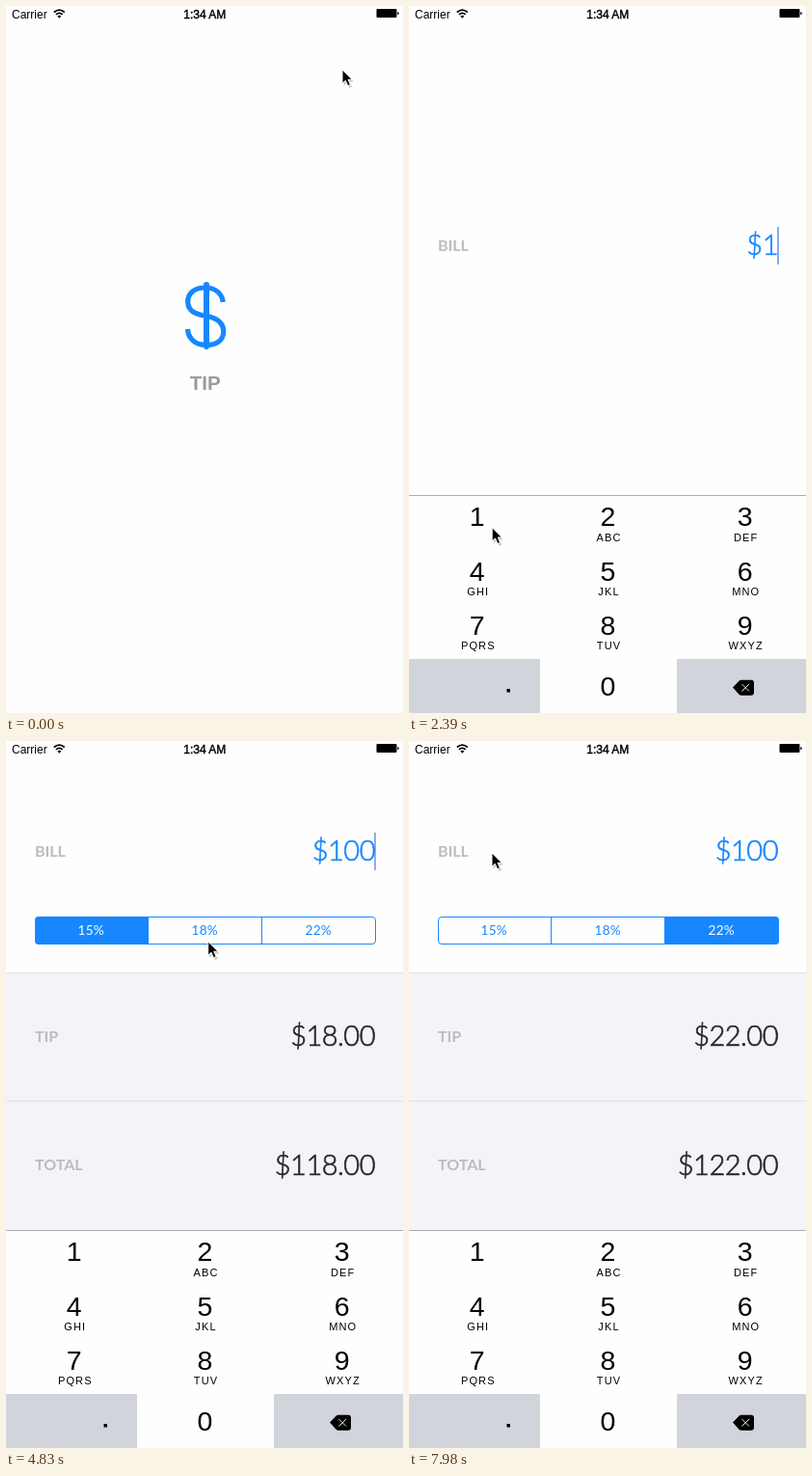
Animation of 412 by 733 pixels, one loop 8000 ms. Source, as an HTML page:

```html
<!DOCTYPE html>
<html lang="en">
<head>
<meta charset="utf-8">
<title>Tip calculator</title>
<style>
  html, body { margin: 0; width: 100%; height: 100%; overflow: hidden; background: #fefefe; }
  svg { display: block; width: 100vw; height: 100vh; }
  text { font-family: "Liberation Sans", Arial, sans-serif; }
  .label { font: 700 16px Lato, sans-serif; fill: #bbbbc1; }
  .amount {
    font: 300 29px Lato, sans-serif; letter-spacing: -.5px; text-anchor: end;
    color: #22282d; fill: currentColor; stroke: currentColor; stroke-width: .65px;
  }
  .pct { font: 400 13.6px Lato, sans-serif; letter-spacing: .3px; text-anchor: middle; }
  .digit { font-size: 28.5px; text-anchor: middle; }
  .letters { font-size: 11px; letter-spacing: 1.1px; text-anchor: middle; }
</style>
</head>
<body>
<svg viewBox="0 0 412 733">
  <rect width="412" height="733" fill="#fefefe"/>

  <g id="launch">
    <g fill="none" stroke="#1787ff" stroke-width="5.2">
      <path d="M225.3 307C224 297 216 292 207 292C196 292 188.7 297.5 188.7 306.5C188.7 317 198 319.8 207 321.3C217 323 225.7 327 225.7 337.5C225.7 347 218 351.5 207 351.5C197 351.5 189 345 188.5 335"/>
      <path d="M208 289V353" stroke-width="6" stroke-linecap="round"/>
    </g>
    <text x="206.7" y="398" font-size="20.5" font-weight="700" text-anchor="middle" fill="#9a9aa3">TIP</text>
  </g>

  <g id="main">
    <g id="bill">
      <text class="label" x="30" y="6">BILL</text>
      <text class="amount" id="billText" x="383" y="10"></text>
      <rect id="caret" x="382" y="-19" width="2" height="39" fill="#4378e0"/>
    </g>
    <g id="results">
      <rect y="240" width="412" height="267" fill="#f4f3fa"/>
      <path d="M0 240.5H412M0 373.5H412" stroke="#dfdfe5"/>
      <text class="label" x="30" y="312">TIP</text>
      <text class="amount" id="tipText" x="383" y="316"></text>
      <text class="label" x="30" y="445">TOTAL</text>
      <text class="amount" id="totalText" x="383" y="450"></text>
      <clipPath id="pill"><rect x="30" y="182" width="354" height="29" rx="4"/></clipPath>
      <rect id="picked" y="182" width="118" height="29" fill="#1787ff" clip-path="url(#pill)"/>
      <g fill="none" stroke="#1787ff">
        <rect x="30.5" y="182.5" width="353" height="28" rx="3.5"/>
        <path d="M147.5 182V211M265.5 182V211"/>
      </g>
      <g id="segments"></g>
    </g>
    <g id="keyboard">
      <rect y="507" width="412" height="226" fill="#fefefe"/>
      <path d="M0 677H136V733H0ZM278 677H412V733H278Z" fill="#d1d4db"/>
      <rect id="pressed" height="56" fill="#d1d4db"/>
      <path d="M0 507.5H412" stroke="#adadb0"/>
      <g id="keys"></g>
      <rect x="101.5" y="708" width="3.5" height="3.5"/>
      <path d="M336 706.5L342.5 699.8Q343.500 698.8 345 698.8H355Q358 698.8 358 701.8V711.8Q358 714.8 355 714.8H345Q343.5 714.8 342.5 713.8Z"/>
      <path d="M345.5 703L353 710.5M353 703L345.5 710.5" stroke="#fff" stroke-width=".9"/>
    </g>
  </g>

  <g id="status">
    <text x="6" y="13" font-size="12">Carrier</text>
    <text x="206.3" y="13" font-size="12" text-anchor="middle" stroke="#000" stroke-width=".4">1:34 AM</text>
    <g fill="none" stroke="#000" stroke-width="1.7">
      <path d="M49.8 6.5Q55.3 1.7 60.8 6.5"/>
      <path d="M51.9 8.9Q55.3 6 58.7 8.9"/>
    </g>
    <path d="M53.3 10.5Q55.3 8.9 57.3 10.5L55.3 12.7Z"/>
    <rect x="384.5" y="3" width="21" height="9" rx="1"/>
    <path d="M406.3 6Q408 6.5 408 7.6T406.3 9.3Z"/>
  </g>

  <g id="cursor">
    <path d="M1 1.5V15.5L4.3 12.5L6.8 18L9.5 16.8L7 11.5H11.3Z" fill="#000" opacity=".22" transform="translate(.5 1)"/>
    <path d="M0 0V14.3L3.3 11.3L5.7 16.8L8.4 15.6L6 10.3H10.3Z" stroke="#fff" stroke-width="1"/>
  </g>
</svg>
<script>
const LOOP = 8000;
const $ = id => document.getElementById(id);
const clamp = v => Math.max(0, Math.min(1, v));
const ramp = (t, from, to) => clamp((t - from) / (to - from));
const smooth = p => p * p * (3 - 2 * p);
const within = (t, from, to) => t >= from && t < to;
const show = (el, on) => el.setAttribute("visibility", on ? "visible" : "hidden");
const move = (el, x, y) => el.setAttribute("transform", `translate(${x} ${y})`);

function addText(parent, cls, x, y, str) {
  const el = document.createElementNS("http://www.w3.org/2000/svg", "text");
  el.setAttribute("class", cls);
  el.setAttribute("x", x);
  el.setAttribute("y", y);
  el.textContent = str;
  parent.appendChild(el);
  return el;
}

// Keypad
const columns = [70.8, 206.5, 348.7];
["", "ABC", "DEF", "GHI", "JKL", "MNO", "PQRS", "TUV", "WXYZ"].forEach((letters, i) => {
  const x = columns[i % 3], row = Math.floor(i / 3);
  addText($("keys"), "digit", x, 539.3 + 56.4 * row, i + 1);
  addText($("keys"), "letters", x + 1, 555 + 56.2 * row, letters);
});
addText($("keys"), "digit", columns[1], 715.3, 0);

const segments = [15, 18, 22].map((p, i) =>
  addText($("segments"), "pct", 88.3 + 118 * i, 201, p + "%"));
const rates = [18, 20, 22];

// Pointer stops: time, x, y
const stops = [
  [85, 349, 66], [270, 248, 341], [430, 248, 341], [720, 205, 470],
  [1160, 125, 625], [1600, 76, 532], [1770, 83.5, 522], [1950, 79, 529],
  [2300, 79, 529], [2900, 195, 717], [4060, 195, 717], [4900, 210, 198],
  [5170, 210, 198], [5520, 316, 197], [5700, 316, 197], [5790, 320, 198],
  [6420, 320, 198], [7010, 49, 128], [7280, 27, 118], [7430, 23, 114],
  [7960, 86, 116]
];

function pointer(t) {
  const i = stops.findIndex(s => s[0] > t);
  if (i === 0) return stops[0].slice(1);
  if (i < 0) return stops[stops.length - 1].slice(1);
  const [t0, x0, y0] = stops[i - 1], [t1, x1, y1] = stops[i];
  const p = smooth(ramp(t, t0, t1));
  return [x0 + (x1 - x0) * p, y0 + (y1 - y0) * p];
}

function caretAlpha(t) {
  const p = t % 1000;
  return ramp(p, 300, 450) * (1 - ramp(p, 750, 950));
}

function draw(t) {
  const open = t >= 450;
  show($("launch"), !open);
  show($("main"), open);

  const bill = t < 2220 ? 0 : t < 3060 ? 1 : t < 3340 ? 10 : 100;
  $("billText").textContent = "$" + bill;
  $("billText").style.color = bill ? "#1787ff" : "#c7c7cc";
  move($("bill"), 0, 248 - 134 * smooth(ramp(t, 2750, 3540)));
  $("caret").setAttribute("opacity", caretAlpha(t));

  const pick = t < 5180 ? 0 : t < 5970 ? 1 : 2;
  const tip = bill * rates[pick] / 100;
  $("tipText").textContent = "$" + tip.toFixed(2);
  $("totalText").textContent = "$" + (bill + tip).toFixed(2);
  $("picked").setAttribute("x", 30 + 118 * pick);
  segments.forEach((el, i) => el.style.fill = i === pick ? "#fff" : "#1787ff");
  $("results").setAttribute("opacity", ramp(t, 3080, 3580));

  move($("keyboard"), 0, 226 * Math.pow(1 - ramp(t, 420, 1020), 3.5));
  const one = within(t, 2120, 2220);
  const zero = within(t, 2960, 3080) || within(t, 3240, 3350);
  const key = $("pressed");
  show(key, open && (one || zero));
  key.setAttribute("x", one ? 0 : 136);
  key.setAttribute("y", one ? 508 : 677);
  key.setAttribute("width", one ? 136 : 142);

  move($("cursor"), ...pointer(t));
}

const start = performance.now();
function tick() {
  draw((performance.now() - start) % LOOP);
  requestAnimationFrame(tick);
}
tick();
</script>
</body>
</html>
```
